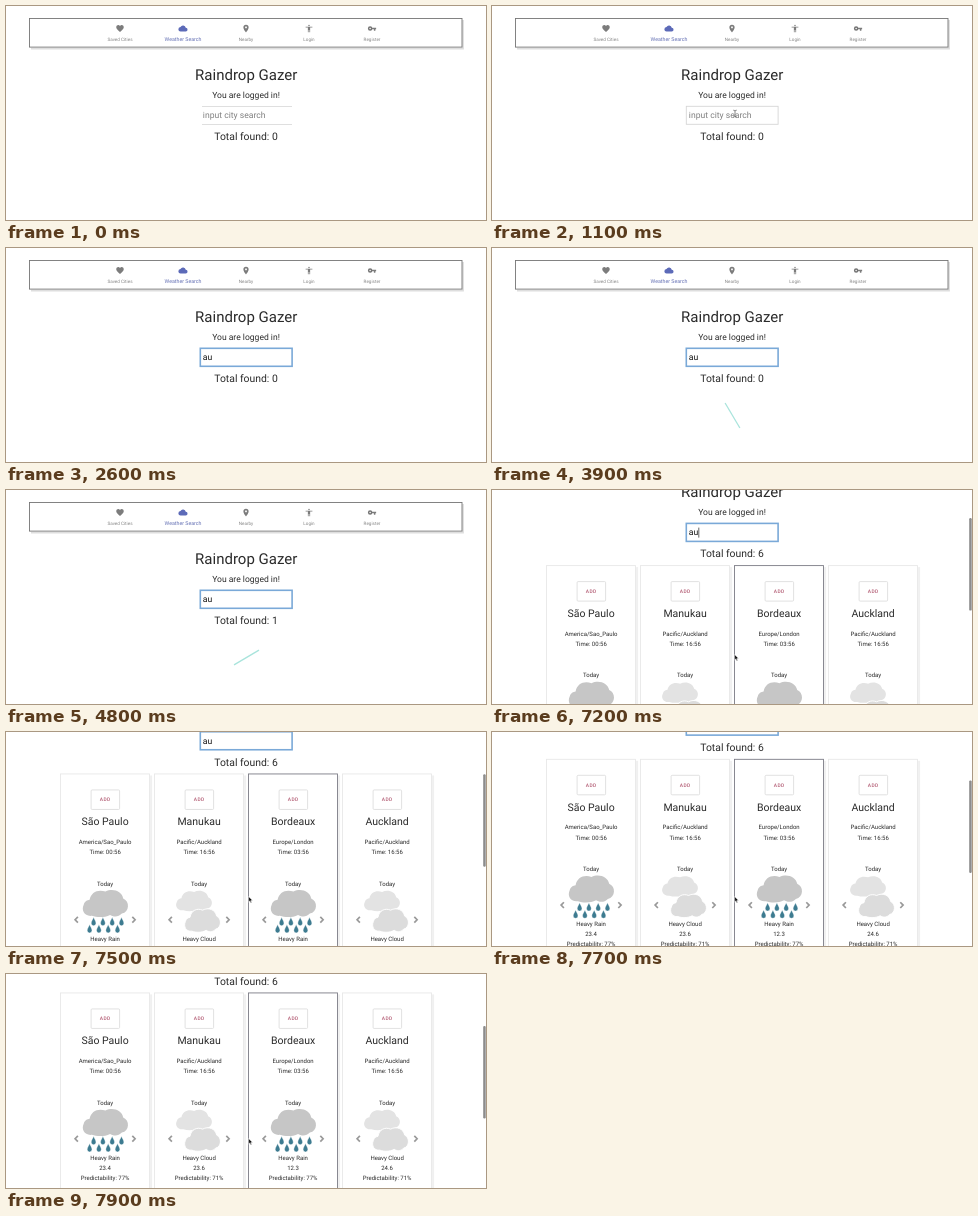
Animation, 480 px wide and 214 px high, one loop 8 s. Source, as an HTML page:

```html
<!DOCTYPE html>
<html lang="en">
<head>
<meta charset="utf-8">
<title>Weather search</title>
<style>
  html, body { margin: 0; width: 100%; height: 100%; overflow: hidden; background: #fff; }
  svg { display: block; width: 480px; height: 214px; }
  text { font-family: Roboto, Arial, sans-serif; fill: #2b2b2b; text-rendering: geometricPrecision; }
  .mid { text-anchor: middle; }
</style>
</head>
<body>
<svg id="stage" viewBox="0 0 480 214" xmlns="http://www.w3.org/2000/svg">
  <defs>
    <path id="cloud" d="M20 56C4 58-4 44 2 32C4 24 10 22 15 21C18 4 34-3 50 3C66-5 86 2 89 18C104 24 103 48 86 51C78 60 66 58 60 54C48 60 32 60 20 56Z"/>
    <path id="drop" d="M0-4.5C1-2 2.4-.6 2.4 1.5A2.4 2.4 0 0 1-2.4 1.5C-2.4-.6-1-2 0-4.5Z"/>
  </defs>
  <g id="page"></g>
  <rect id="thumb" x="477.2" width="2.5" height="92.5" rx="1.2" fill="#8c8c8c"/>
  <path id="ibeam" d="M241.3 104.2q1.7 0 1.7 1v4.6q0 1-1.7 1M244.7 104.2q-1.7 0-1.7 1M244.7 110.8q-1.7 0-1.7-1" fill="none" stroke="#555" stroke-width=".7"/>
  <path id="arrow" d="M0 0V5.6L1.3 4.4L2.2 6.4L3.1 6L2.2 4.1H4Z" fill="#111" stroke="#fff" stroke-width=".5"/>
</svg>
<script>
const LOOP = 8000;
const $ = id => document.getElementById(id);

const label = (x, y, size, str, extra = '') =>
  `<text class="mid" x="${x}" y="${y}" font-size="${size}" ${extra}>${str}</text>`;
const cloud = (x, y, w, h, fill, extra = '') =>
  `<use href="#cloud" transform="translate(${x} ${y}) scale(${w / 100} ${h / 58})" fill="${fill}" ${extra}/>`;

// Tab icons on a 24-unit grid
const tabs = [
  ['Saved Cities', '<path d="M12 21C5 15 2 12 2 8.5C2 3 9 1 12 5.2C15 1 22 3 22 8.5C22 12 19 15 12 21Z"/>'],
  ['Weather Search', '<path d="M6 20A6 6 0 0 1 5.3 8A7.5 7.5 0 0 1 19.3 10A5 5 0 0 1 19 20Z"/>'],
  ['Nearby', '<path fill-rule="evenodd" d="M12 22C12 22 5 14.3 5 9A7 7 0 0 1 19 9C19 14.3 12 22 12 22ZM12 6.5a2.5 2.5 0 1 0 .01 0Z"/>'],
  ['Login', '<circle cx="12" cy="4" r="2"/><path d="M3 7H21V9H15V22H13V16H11V22H9V9H3Z"/>'],
  ['Register', '<circle cx="7" cy="12" r="4" fill="none" stroke="#757575" stroke-width="4"/><path d="M12 10H23V14H21V18H17V14H12Z"/>']
];

const nav = () => `
  <path d="M25 42.7H457V14" fill="none" stroke="#dedede" stroke-width="1.8"/>
  <rect x="23.5" y="12.5" width="432.5" height="28.6" fill="#fff" stroke="#757575" stroke-width=".9"/>` +
  tabs.map(([name, icon], i) => {
    const x = 114 + 63 * i, on = i === 1;
    return `<g transform="translate(${x - 4.5} 18) scale(.375)" fill="${on ? '#5c6ab8' : '#7c7c7c'}">${icon}</g>` +
      label(x, 34.7, on ? 5.25 : 4.6, name, `style="fill:${on ? '#6470b4' : '#858585'}"`);
  }).join('');

const rainIcon = x => {
  let out = cloud(x - 22.3, 258.8, 45.4, 26.5, '#c6c6c6');
  for (let i = 0; i < 8; i++) {
    const low = i > 3;
    const dx = -11.5 + (i % 4) * 9.3 - (low ? 4 : 0);
    out += `<use href="#drop" x="${x + dx}" y="${low ? 297.6 : 290.4}" fill="#3d7b90" stroke="#fff" stroke-width=".4"/>`;
  }
  return out;
};
const cloudIcon = x =>
  cloud(x - 23, 259.5, 36, 20, '#e3e3e3') +
  cloud(x - 14.5, 277.5, 36, 23, '#dcdcdc', 'stroke="#fff" stroke-width="2.5"');

const cities = [
  ['São Paulo', 'America/Sao_Paulo', '00:56', true, '23.4'],
  ['Manukau', 'Pacific/Auckland', '16:56', false, '23.6'],
  ['Bordeaux', 'Europe/London', '03:56', true, '12.3'],
  ['Auckland', 'Pacific/Auckland', '16:56', false, '24.6']
];

const card = ([city, zone, time, rain, temp], i) => {
  const x = 99.1 + 94 * i;
  const chevron = (dx, dir) =>
    `<path d="M${x + dx - dir * 1.3} 285.4l${dir * 2.8} 2.9l${-dir * 2.8} 2.9" fill="none" stroke="#999" stroke-width="1.7"/>`;
  return `
    <path d="M${x + 46} 144V346" stroke="#f0f0f0" stroke-width="2"/>
    <rect class="frame" x="${x - 44.6}" y="142.5" width="89" height="205" fill="#fff" stroke="#e8e8e8" stroke-width=".9"/>
    <rect x="${x - 14}" y="158.5" width="28.5" height="19.5" rx="1" fill="#fff" stroke="#dadada" stroke-width=".8"/>` +
    label(x + .2, 169.8, 4.9, 'ADD', 'font-weight="500" letter-spacing=".4" style="fill:#b25a72"') +
    label(x, 193.8, 10.5, city) +
    label(x, 212.5, 6, zone) +
    label(x, 222.7, 6, 'Time: ' + time) +
    label(x, 254.1, 6, 'Today') +
    (rain ? rainIcon(x) : cloudIcon(x)) +
    chevron(-28.5, -1) + chevron(28.5, 1) +
    label(x, 309.3, 6, rain ? 'Heavy Rain' : 'Heavy Cloud') +
    label(x, 319.2, 6, temp) +
    label(x, 329.6, 6, `Predictability: ${rain ? 77 : 71}%`);
};

$('page').innerHTML = nav() +
  label(240.2, 73.6, 15, 'Raindrop Gazer') +
  label(240, 91.7, 8.55, 'You are logged in!') + `
  <path id="edges" d="M196 100.5H286M196 118.5H286" stroke="#dcdcdc" stroke-width=".9"/>
  <rect id="box" x="194.3" y="100.3" width="91.8" height="18" fill="none"/>
  <text id="field" x="196.8" y="112.3" font-size="8.6"></text>
  <path id="caret" d="M206.8 104.5V114.5" stroke="#222" stroke-width=".7"/>` +
  label(240, 134.1, 10.4, '', 'id="total"') + `
  <path id="spinner" d="M-14.5 0H14.5" stroke="#a9e4dc" stroke-width="1.3"/>
  <g id="cards">${cities.map(card).join('')}</g>`;

const show = (id, on) => $(id).setAttribute('visibility', on ? 'visible' : 'hidden');
const clamp = v => Math.max(0, Math.min(1, v));
const easeOut = u => 1 - (1 - u) ** 2;

function draw(t) {
  const scroll = 125.8 * easeOut(clamp((t - 6800) / 1270));
  const focused = t >= 1400;
  const typed = t < 2000 ? '' : t < 2400 ? 'a' : 'au';
  const loaded = t >= 6100;

  $('page').setAttribute('transform', `translate(0 ${-scroll})`);

  show('edges', t < 100);
  show('box', t >= 100);
  $('box').setAttribute('stroke', focused ? '#7aa9d8' : '#d6d6d6');
  $('box').setAttribute('stroke-width', focused ? 1.6 : .9);
  $('field').textContent = typed || 'input city search';
  $('field').style.fill = typed ? '#111' : '#808080';
  show('caret', focused && t % 1000 < 500);
  $('caret').setAttribute('transform', `translate(${(typed.length - 2) * 4.7} 0)`);

  const found = loaded ? 6 : t < 4300 ? 0 : 1 + Math.max(0, Math.floor((t - 4700) / 300));
  $('total').textContent = 'Total found: ' + Math.min(found, 6);

  show('spinner', t >= 3400 && !loaded);
  $('spinner').setAttribute('transform', `translate(240.5 167.5) rotate(${-31 + (t - 4800) * .3})`);

  const y = 125 + 39.5 * easeOut(clamp((t - 6300) / 400));
  show('cards', loaded);
  show('ibeam', t >= 500 && t < 2000);
  show('arrow', t >= 6300);
  $('arrow').setAttribute('transform', `translate(242.6 ${y})`);
  const hover = t >= 6300 && y + scroll > 142.5;
  document.querySelectorAll('.frame')[2].setAttribute('stroke', hover ? '#7c7c86' : '#e8e8e8');

  show('thumb', scroll > 0);
  $('thumb').setAttribute('y', scroll * .42);
}

function tick(now) {
  draw(now % LOOP);
  requestAnimationFrame(tick);
}
draw(0);
requestAnimationFrame(tick);
</script>
</body>
</html>
```
